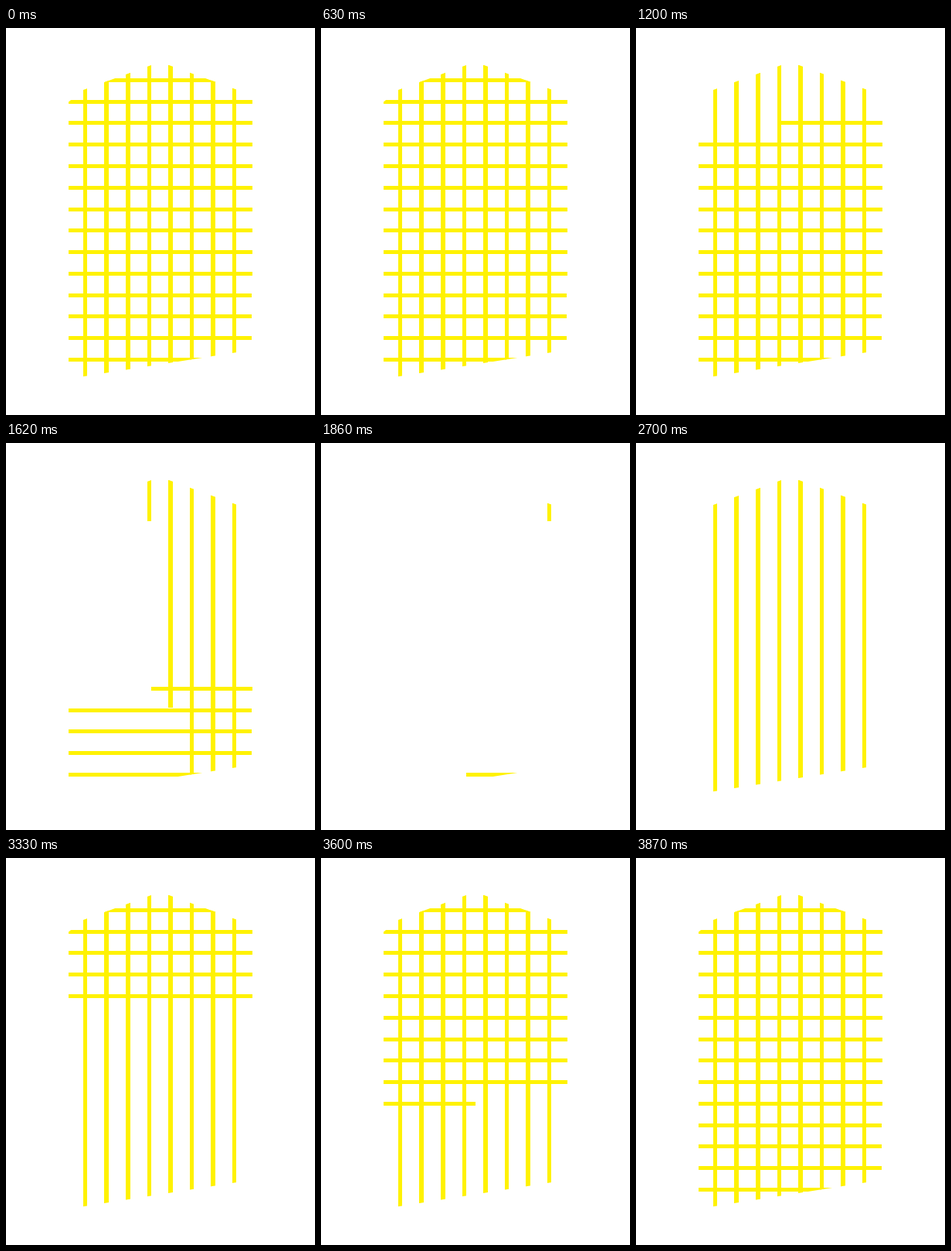
Write an HTML page with a canvas that moves like this. It is 400 by 500 pixels and loops after 4.05 s.

```html
<!DOCTYPE html>
<html lang="en">
<head>
<meta charset="utf-8">
<title>Trellis</title>
<style>
  html, body { margin: 0; width: 100%; height: 100%; overflow: hidden; background: #fff; }
  canvas { display: block; }
</style>
</head>
<body>
<canvas id="stage" width="400" height="500"></canvas>
<script>
const ctx = document.getElementById('stage').getContext('2d');
const STEP = 30, LOOP = 4050;
const LEFT = 81, RIGHT = 319, TOP = 40, BOTTOM = 460;

const rows = { count: 14, first: 65.44, pitch: 27.77, width: 5 };
const columns = { count: 8, first: 100.3, pitch: 27.57, width: 5.6 };

// The window shape that trims every bar
const outline = new Path2D(`M81 95.5 L100 80 L188 48 H211 L319 87
  V340 H318 V416 L81 453.3 Z`);

// Rows are wiped and redrawn from left to right, two steps each
function rowSpan(step, i) {
  const wiped = step - 36 - 2 * i;
  const drawn = step - 102 - 2 * i;
  if (wiped < 0 || drawn > 0) return [LEFT, RIGHT];
  if (wiped === 0) return [188, RIGHT];
  return [LEFT, drawn === 0 ? 200 : LEFT];
}

// Columns are wiped and redrawn from the bottom up
function columnSpan(step, i) {
  const wiped = step - 46 - 2 * i;
  const drawn = step - 74 - 2 * i;
  if (wiped < 0) return [TOP, BOTTOM];
  if (drawn < 0) return [TOP, Math.max(TOP, 342 - 120.5 * wiped)];
  return [Math.max(TOP, 332 - 142 * drawn), BOTTOM];
}

// Calls draw(start, thickness, index) for each bar, with edges on whole pixels
function eachBar({ count, first, pitch, width }, draw) {
  for (let i = 0; i < count; i++) {
    const edge = first + pitch * i;
    const start = Math.floor(edge);
    draw(start, Math.floor(edge + width) - start, i);
  }
}

function render(time) {
  const step = Math.floor(time % LOOP / STEP);
  ctx.clearRect(0, 0, 400, 500);
  ctx.save();
  ctx.clip(outline);
  ctx.fillStyle = '#fff200';
  eachBar(rows, (y, height, i) => {
    const [from, to] = rowSpan(step, i);
    ctx.fillRect(from, y, to - from, height);
  });
  eachBar(columns, (x, width, i) => {
    const [from, to] = columnSpan(step, i);
    ctx.fillRect(x, from, width, to - from);
  });
  ctx.restore();
}

const start = performance.now();
function tick() {
  render(performance.now() - start);
  requestAnimationFrame(tick);
}
tick();
</script>
</body>
</html>
```
